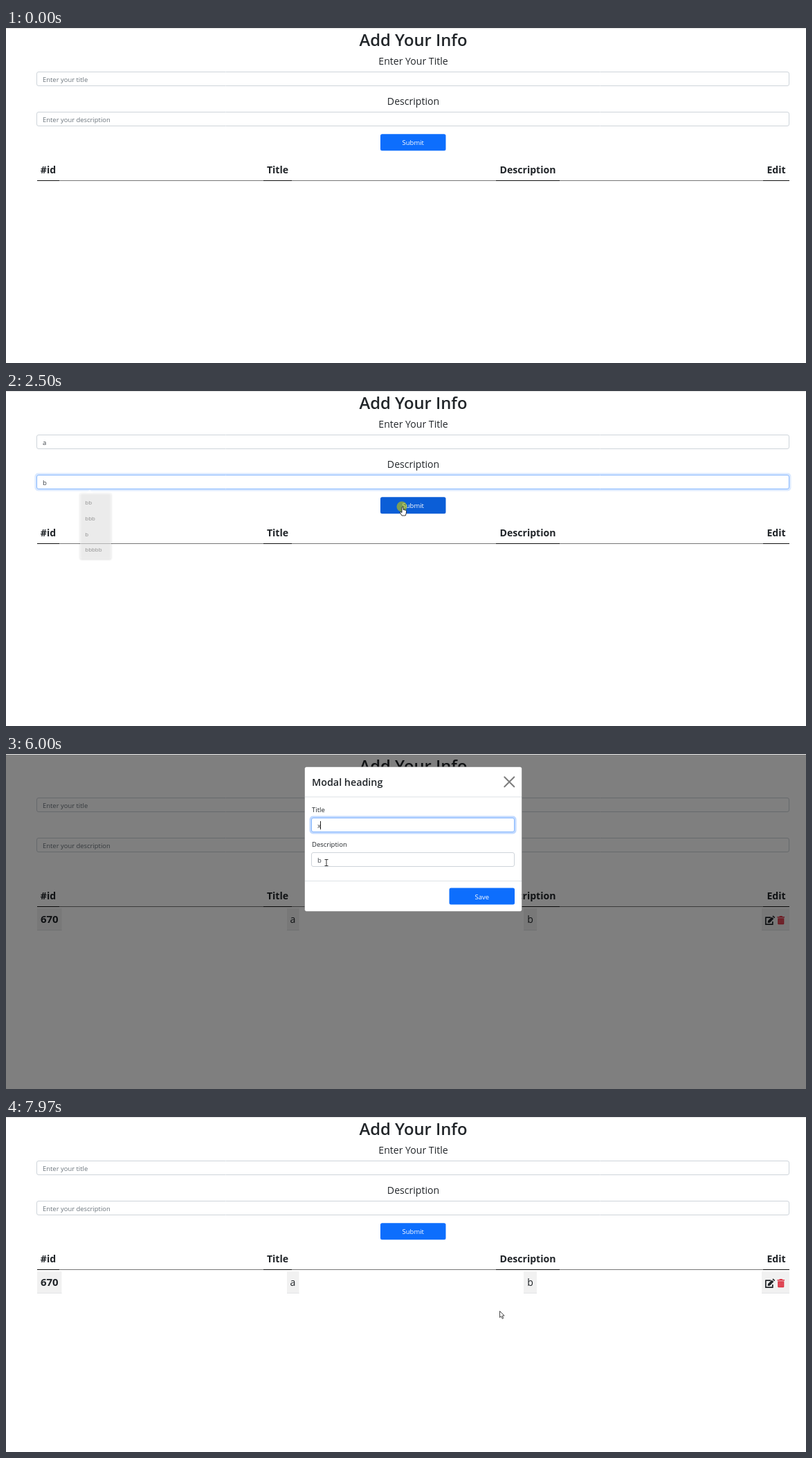
These frames come from a looping animation (1156 by 484 pixels, 8000 ms). An HTML page with a canvas:

```html
<!DOCTYPE html>
<html lang="en">
<head>
<meta charset="utf-8">
<title>Add Your Info</title>
<style>
  html, body { margin: 0; width: 100%; height: 100%; overflow: hidden; background: #fff; }
  canvas { display: block; }
</style>
</head>
<body>
<canvas id="stage" width="1156" height="484"></canvas>
<script>
const ctx = document.getElementById('stage').getContext('2d');
const LOOP = 8000;
const FONT = '"Open Sans", "Noto Sans", sans-serif';
const INK = '#212529', BLUE = '#0d6efd', DARK_BLUE = '#0b5ed7';
const HINTS_B = ['bb', 'bbb', 'b', 'bbbbb'];
const HINTS_Y = ['ymi', 'yutyu'];

// Each step overrides part of the state from its time on.
const steps = [
  { at: 0, title: '', desc: '', focus: '', ring: 1, caret: false, mouse: null, menu: null,
    submit: 'idle', row: false, modal: false },
  { at: 500, mouse: ['arrow', 327, 209] },
  { at: 990, mouse: ['beam', 115, 74], focus: 'title', caret: true },
  { at: 1500, mouse: ['beam', 115, 128], title: 'a', desc: 'b', focus: 'desc',
    menu: { x: 107, y: 147, items: HINTS_B, alpha: 1 } },
  { at: 2010, mouse: ['arrow', 501, 165], caret: false },
  { at: 2500, mouse: ['hand', 573, 167], click: true, ring: 0.6, submit: 'down',
    menu: { x: 107, y: 147, items: HINTS_B, alpha: 0.5 } },
  { at: 3000, click: false, title: '', desc: '', focus: '', menu: null, submit: 'focus', row: true },
  { at: 3500, mouse: ['arrow', 1103, 248] },
  { at: 3980, mouse: ['arrow', 1102, 245], submit: 'idle' },
  { at: 4490, mouse: ['arrow', 1019, 247], modal: true, mTitle: 'a', mDesc: 'b', mFocus: '', save: 'idle', ring: 1 },
  { at: 4990, mouse: ['arrow', 431, 104], mFocus: 'title', selected: true },
  { at: 5500, mTitle: 'x', selected: false, caret: true },
  { at: 6000, mouse: ['beam', 463, 157] },
  { at: 6480, mouse: ['beam', 443, 151], mFocus: 'desc', selected: true, caret: false,
    menu: { x: 505, y: 168, items: HINTS_B, alpha: 1 } },
  { at: 6980, mouse: ['beam', 513, 153], mDesc: 'y', selected: false, caret: true,
    menu: { x: 505, y: 168, items: HINTS_Y, alpha: 1 } },
  { at: 7460, mouse: ['hand', 697, 207], click: true, caret: false, ring: 0.85, save: 'down',
    menu: { x: 505, y: 168, items: HINTS_Y, alpha: 0.55 } },
  { at: 7970, mouse: ['arrow', 713, 280], click: false, modal: false, menu: null }
];

function stateAt(t) {
  return Object.assign({}, ...steps.filter(s => s.at <= t));
}

function rect(x, y, w, h, color) {
  ctx.fillStyle = color;
  ctx.fillRect(x, y, w, h);
}

function round(x, y, w, h, r) {
  ctx.beginPath();
  ctx.roundRect(x, y, w, h, r);
}

function text(str, x, y, size, { color = INK, weight = 400, align = 'left' } = {}) {
  ctx.font = `${weight} ${size}px ${FONT}`;
  ctx.fillStyle = color;
  ctx.textAlign = align;
  ctx.fillText(str, x, y);
  return ctx.measureText(str).width;
}

function poly(points, fill, stroke, width = 1) {
  ctx.beginPath();
  points.forEach(([x, y]) => ctx.lineTo(x, y));
  ctx.closePath();
  if (fill) { ctx.fillStyle = fill; ctx.fill(); }
  if (stroke) { ctx.strokeStyle = stroke; ctx.lineWidth = width; ctx.stroke(); }
}

function field(x, y, w, value, hint, { focus, ring, caret, selected }) {
  const h = 20;
  if (focus) {
    round(x - 3, y - 3, w + 6, h + 6, 5);
    ctx.fillStyle = `rgba(13,110,253,${0.25 * ring})`;
    ctx.fill();
  }
  round(x, y, w, h, 2.5);
  ctx.fillStyle = '#fff';
  ctx.fill();
  ctx.strokeStyle = focus ? '#86b7fe' : '#ced4da';
  ctx.lineWidth = 1;
  ctx.stroke();
  const tx = x + 8.5, base = y + 14.5;
  if (!value) text(hint, tx, base, 9.45, { color: '#6c757d' });
  let end = 0;
  if (value) {
    if (focus && selected) rect(tx, y + 3.5, 5.5, 14, '#2f7fe0');
    end = text(value, tx, base, 9.5, { color: focus && selected ? '#fff' : '#3c4248' });
  }
  if (focus && caret) rect(Math.round(tx + end - 0.5), y + 4.5, 1, 12, '#222');
}

function button(x, y, w, label, mode) {
  if (mode === 'focus') {
    round(x - 2.5, y - 2.5, w + 5, 29, 5);
    ctx.fillStyle = 'rgba(49,132,253,.5)';
    ctx.fill();
  }
  round(x, y, w, 24, 2.5);
  ctx.fillStyle = mode === 'idle' ? BLUE : DARK_BLUE;
  ctx.fill();
  text(label, x + w / 2, y + 16, 9.45, { color: '#fff', align: 'center' });
}

function editIcon() {
  ctx.strokeStyle = INK;
  ctx.lineWidth = 1.7;
  ctx.lineJoin = 'round';
  ctx.beginPath();
  ctx.moveTo(1105, 236.2);
  ctx.lineTo(1097.8, 236.2);
  ctx.lineTo(1097.8, 246.2);
  ctx.lineTo(1107.8, 246.2);
  ctx.lineTo(1107.8, 242);
  ctx.stroke();
  poly([[1101, 241], [1106.6, 235.4], [1109.3, 238.1], [1103.7, 243.7], [1100.6, 244]], INK);
  poly([[1107.4, 234.6], [1108.7, 233.5], [1111.3, 236], [1110.1, 237.3]], INK);
  ctx.lineJoin = 'miter';
}

function trashIcon() {
  const red = '#dc3545';
  rect(1114.5, 235, 10.5, 1.5, red);
  rect(1117.6, 234, 4.3, 1.2, red);
  round(1115.2, 237.2, 9.1, 9.1, [0, 0, 1.2, 1.2]);
  ctx.fillStyle = red;
  ctx.fill();
  [1117.4, 1119.6, 1121.8].forEach(x => rect(x, 238.6, 0.5, 6.2, 'rgba(255,255,255,.45)'));
}

function table(hasRow) {
  const heads = [['#id', 45, 32], ['Title', 372, 41], ['Description', 708, 92], ['Edit', 1094, 38]];
  rect(45, 220, 1087, 1, '#777');
  for (const [label, x, w] of heads) {
    text(label, x + w / 2, 210, 14.1, { weight: 700, align: 'center' });
    rect(x, 220, w, 1, '#111');
  }
  if (!hasRow) return;
  for (const [x, w] of [[45, 35.5], [406, 17.5], [748, 19], [1092, 40]]) {
    rect(x, 223, w, 32, '#f1f1f1');
    rect(x, 254, w, 1, '#e2e4e6');
  }
  text('670', 50, 244, 15, { weight: 700 });
  text('a', 414.3, 244, 14.1, { align: 'center' });
  text('b', 757.5, 244, 14.1, { align: 'center' });
  editIcon();
  trashIcon();
}

function menu({ x, y, items, alpha }) {
  const w = 45, h = 5 + items.length * 22.65;
  ctx.save();
  ctx.globalAlpha = alpha;
  ctx.shadowColor = 'rgba(0,0,0,.3)';
  ctx.shadowBlur = 3;
  ctx.shadowOffsetY = 1;
  round(x, y, w, h, 2);
  ctx.fillStyle = '#fff';
  ctx.fill();
  ctx.shadowColor = 'transparent';
  poly([[x + 9, y + 0.5], [x + 14, y - 4.5], [x + 19, y + 0.5]], '#fff');
  items.forEach((s, i) => text(s, x + 7.3, y + 17.2 + i * 22.65, 7.9, { color: '#333' }));
  ctx.restore();
}

function modal(s) {
  rect(0, 1, 1156, 483, 'rgba(0,0,0,.5)');
  round(431.5, 18.5, 314, 209, 3);
  ctx.fillStyle = '#fff';
  ctx.fill();
  ctx.strokeStyle = 'rgba(0,0,0,.2)';
  ctx.lineWidth = 1;
  ctx.stroke();
  text('Modal heading', 442, 46, 14.3, { weight: 600 });
  ctx.strokeStyle = '#7d7d7d';
  ctx.lineWidth = 2;
  ctx.lineCap = 'round';
  ctx.beginPath();
  for (const d of [-7, 7]) {
    ctx.moveTo(727.3 - 7, 40.3 - d);
    ctx.lineTo(727.3 + 7, 40.3 + d);
  }
  ctx.stroke();
  ctx.lineCap = 'butt';
  rect(432, 61.5, 313, 1, '#dee2e6');
  rect(432, 183, 313, 1, '#dee2e6');
  text('Title', 442, 83.5, 9.5);
  text('Description', 442, 134, 9.5);
  field(441.5, 92.5, 293, s.mTitle, '', { ...s, focus: s.mFocus === 'title' });
  field(441.5, 142.5, 293, s.mDesc, '', { ...s, focus: s.mFocus === 'desc' });
  button(640.5, 193.5, 94.5, 'Save', s.save);
}

function pointer([kind, x, y], click) {
  if (click) {
    ctx.beginPath();
    ctx.arc(x - 1, y, 7.5, 0, Math.PI * 2);
    ctx.fillStyle = 'rgba(200,200,0,.6)';
    ctx.fill();
  }
  ctx.save();
  ctx.translate(x, y);
  if (kind === 'arrow') {
    poly([[0.5, 0.5], [0.5, 9.7], [2.6, 7.8], [4.2, 11.4], [5.7, 10.7], [4.2, 7.2], [7.1, 7]], '#fff', '#333', 0.9);
  } else if (kind === 'beam') {
    ctx.strokeStyle = '#333';
    ctx.lineWidth = 1;
    ctx.beginPath();
    ctx.moveTo(-2.5, -4.5); ctx.lineTo(2.5, -4.5);
    ctx.moveTo(0, -4.5); ctx.lineTo(0, 4.5);
    ctx.moveTo(-2.5, 4.5); ctx.lineTo(2.5, 4.5);
    ctx.stroke();
  } else {
    ctx.lineJoin = 'round';
    poly([[-1, 1], [0, 0.3], [1, 1], [1, 4.4], [4.6, 5.2], [5.6, 6.2], [5.3, 9.6], [4.3, 13],
      [-1, 13], [-3.8, 8.4], [-3.3, 7.3], [-1, 8.6]], '#fff', '#222', 0.9);
  }
  ctx.restore();
}

function draw(s) {
  rect(0, 0, 1156, 484, '#fff');
  rect(0, 0, 1156, 1, '#e4e4e4');
  const mid = { align: 'center' };
  text('Add Your Info', 588.5, 25.7, 23.8, { weight: 600, align: 'center' });
  text('Enter Your Title', 588.5, 53, 14.1, mid);
  text('Description', 588.5, 111, 14.1, mid);
  field(44.5, 63.5, 1087, s.title, 'Enter your title', { ...s, focus: s.focus === 'title' });
  field(44.5, 121.5, 1087, s.desc, 'Enter your description', { ...s, focus: s.focus === 'desc' });
  button(541, 153.3, 94.5, 'Submit', s.submit);
  table(s.row);
  if (s.modal) modal(s);
  if (s.menu) menu(s.menu);
  if (s.mouse) pointer(s.mouse, s.click);
}

const start = performance.now();
function tick() {
  draw(stateAt((performance.now() - start) % LOOP));
  requestAnimationFrame(tick);
}
tick();
</script>
</body>
</html>
```
